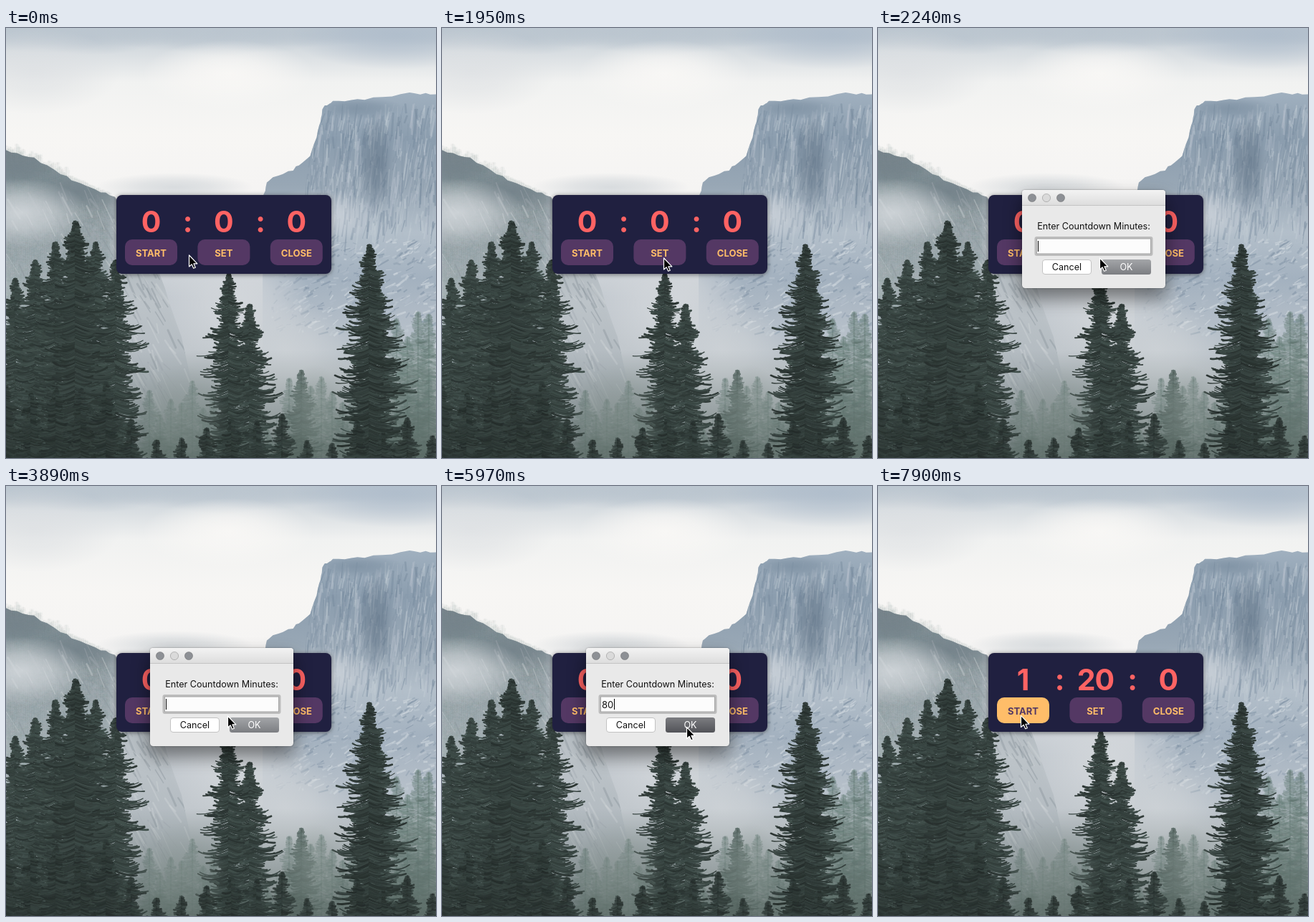
An HTML page with a canvas that plays this animation: 600x600 px, repeating every 8000 ms.

```html
<!DOCTYPE html>
<html lang="en">
<head>
<meta charset="utf-8">
<title>Countdown timer</title>
<style>
  html, body { margin: 0; width: 100%; height: 100%; overflow: hidden; background: #c5cbd0; }
  canvas, svg { position: absolute; left: 0; top: 0; width: 600px; height: 600px; }
  text { font-family: Inter, sans-serif; text-anchor: middle; }
  .digit { font-size: 41px; font-weight: 700; letter-spacing: -1px; fill: #ff6363; }
  .btn rect { fill: #543864; }
  .btn text { font-size: 13px; font-weight: 700; fill: #ffbd69; }
  .btn.hover rect { fill: #ffbd69; }
  .btn.hover text { fill: #543864; }
  .ui { font-size: 12.6px; fill: #111; }
  #panel { filter: drop-shadow(0 1px 3px rgba(0, 0, 0, .5)); }
  #window { filter: drop-shadow(0 13px 13px rgba(0, 0, 0, .38)) drop-shadow(0 0 1px rgba(0, 0, 0, .4)); }
</style>
</head>
<body>
<canvas id="scene" width="600" height="600"></canvas>
<svg viewBox="0 0 600 600">
  <defs>
    <linearGradient id="bar" x2="0" y2="1"><stop stop-color="#f3f3f3"/><stop offset="1" stop-color="#dcdcdc"/></linearGradient>
    <linearGradient id="ok" x2="0" y2="1"><stop stop-color="#a3a5a8"/><stop offset="1" stop-color="#7c7e82"/></linearGradient>
    <linearGradient id="okDown" x2="0" y2="1"><stop stop-color="#7c7d81"/><stop offset="1" stop-color="#525358"/></linearGradient>
  </defs>
  <rect id="panel" x="154" y="233" width="300" height="110" rx="8" fill="#202040"/>
  <g id="face"></g>
  <g id="dialog">
    <rect id="window" x="201" y="226" width="200" height="137" rx="4.5" fill="#e9e9e9"/>
    <path d="M201 248V230Q201 226 205 226H397Q401 226 401 230V248Z" fill="url(#bar)"/>
    <path d="M201 247.5H401" stroke="#c4c4c4"/>
    <g id="dots"></g>
    <text class="ui" x="301" y="281">Enter Countdown Minutes:</text>
    <rect x="218.5" y="291" width="165" height="27" rx="3" fill="#bdbdbd"/>
    <rect x="221.5" y="294" width="159" height="21" fill="#fcfcfc" stroke="#a5a5a5"/>
    <text class="ui" id="entry" x="223" y="309.5" style="text-anchor:start;font-size:13px"></text>
    <rect id="caret" y="297" width="1" height="15"/>
    <rect x="229.5" y="323.5" width="68" height="20" rx="3.5" fill="#fff" stroke="#c2c2c2"/>
    <text class="ui" x="263.5" y="338">Cancel</text>
    <rect id="okBtn" x="312" y="323" width="69" height="21" rx="3.5"/>
    <text class="ui" x="346.5" y="338" style="fill:#fff">OK</text>
  </g>
  <path id="cursor" d="M0 0V16L3.7 12.8L6.2 18.3L8.8 17.2L6.4 11.8H11.4Z" stroke="#fff" stroke-width="1.2" stroke-linejoin="round"/>
</svg>
<script>
const $ = id => document.getElementById(id);

// ---- Backdrop: misty valley ----
const ctx = $('scene').getContext('2d');
let seed = 11;
const rnd = () => {
  seed = (seed + 0x6D2B79F5) | 0;
  let n = Math.imul(seed ^ (seed >>> 15), 1 | seed);
  n = (n + Math.imul(n ^ (n >>> 7), 61 | n)) ^ n;
  return ((n ^ (n >>> 14)) >>> 0) / 4294967296;
};
const between = (a, b) => a + (b - a) * rnd();

function ramp(y0, y1, ...colors) {
  const g = ctx.createLinearGradient(0, y0, 0, y1);
  colors.forEach((c, i) => g.addColorStop(i / (colors.length - 1), c));
  return g;
}
function wash(y, fill) {
  ctx.fillStyle = fill;
  ctx.fillRect(0, y, 600, 600 - y);
}
function soft(x, y, rx, ry, color, alpha) {
  const g = ctx.createRadialGradient(0, 0, 0, 0, 0, 1);
  g.addColorStop(0, color);
  g.addColorStop(.45, color + 'b0');
  g.addColorStop(1, color + '00');
  ctx.save();
  ctx.globalAlpha = alpha;
  ctx.translate(x, y);
  ctx.scale(rx, ry);
  ctx.fillStyle = g;
  ctx.fillRect(-1, -1, 2, 2);
  ctx.restore();
}
// Rock face with a jagged skyline, falling to the bottom of the stage
function rock(skyline, fill) {
  const p = skyline.split(' ').map(s => s.split(',').map(Number));
  const path = new Path2D(`M${p[0][0]} 600`);
  p.forEach(([x, y], i) => {
    const [nx, ny] = p[i + 1] || [x, y];
    for (let k = 0; k < 1; k += .2)
      path.lineTo(x + (nx - x) * k + between(-1, 1), y + (ny - y) * k + between(-1.5, 1.5));
  });
  path.lineTo(p.at(-1)[0], 600);
  ctx.fillStyle = fill;
  ctx.fill(path);
  return path;
}
function streaks(count, x0, y0, x1, y1, dx, dy, colors) {
  ctx.globalAlpha = .4;
  for (let i = 0; i < count; i++) {
    const x = between(x0, x1), y = between(y0, y1), k = between(.2, 1);
    ctx.strokeStyle = colors[i % colors.length];
    ctx.lineWidth = between(.6, 3);
    ctx.beginPath();
    ctx.moveTo(x, y);
    ctx.lineTo(x + dx * k + between(-4, 4), y + dy * k + between(-4, 4));
    ctx.stroke();
  }
  ctx.globalAlpha = 1;
}
// Conifer: ragged boughs, widening downwards to the full half-width
function tree(x, top, width, tone = 24, alpha = 1) {
  ctx.globalAlpha = alpha;
  ctx.lineCap = 'round';
  for (const side of [-1, 1]) {
    const phase = rnd() * 6;
    for (let y = 0; top + y < 605; y += 1.1) {
      const tier = .72 + .28 * Math.sin(y * .21 + phase + Math.sin(y * .06));
      const r = 2 + width * Math.min(1, (y / width / 2.7) ** .8) * tier * between(.3, 1.1);
      ctx.strokeStyle = `hsl(165 10% ${tone + between(-5, 5)}%)`;
      ctx.lineWidth = between(1, 3);
      ctx.beginPath();
      ctx.moveTo(x, top + y - r * .1);
      ctx.quadraticCurveTo(x + side * r * .6, top + y + r * .2, x + side * r, top + y + between(-.1, .2) * r);
      ctx.stroke();
    }
  }
  ctx.globalAlpha = 1;
}

function paintScene() {
  const blues = ['#71849a', '#c3ccd5', '#8596a7', '#b3bfca'];
  const greys = ['#87929a', '#d0d4d7', '#a0a9b0'];

  wash(0, ramp(0, 600, '#c3ccd4', '#f1f2f1', '#f7f6f4', '#f5f4f3', '#d8dce0', '#c5cbd1', '#c2c8cd', '#a4adb1', '#78868a'));
  for (let x = 0; x <= 600; x += 60)
    soft(x, between(0, 14), 95, between(14, 36), '#b9c4ce', .7);
  soft(545, 10, 150, 48, '#aebccb', .8);
  soft(40, 60, 120, 60, '#dcdfe2', .7);
  soft(310, 65, 120, 48, '#f8f7f5', 1);
  soft(235, 222, 110, 20, '#d5d9dc', .9);

  ctx.save();
  ctx.clip(rock('358,236 366,212 400,198 424,180 438,135 443,110 456,102 500,100 563,90 600,93',
    ramp(90, 480, '#a0b0bf', '#8b9dae', '#98a7b5', '#b3bfca', '#a3b1bf', '#b4bec8', '#c3c9ce')));
  streaks(600, 420, 105, 600, 280, -5, 42, blues);
  soft(516, 190, 26, 75, '#5f7285', .6);
  soft(490, 112, 65, 16, '#7d90a2', .8);
  streaks(500, 370, 295, 600, 430, 12, -6, ['#e3e8ec', ...blues]);
  ctx.restore();

  const slope = rock('0,170 40,182 84,208 118,224 152,236 205,320 245,430 285,600',
    ramp(165, 600, '#7c8991', '#a9b2b8', '#bcc3c8', '#b0b8be', '#a0a9af'));
  for (let x = 0; x < 145; x += 3)
    tree(x, 170 + x * .43 - between(0, x < 85 ? 14 : 3), 5, 46, .03);
  ctx.save();
  ctx.clip(slope);
  soft(100, 228, 75, 30, '#74828a', .9);
  soft(15, 195, 60, 28, '#74828a', .8);
  streaks(420, 0, 210, 270, 560, 20, 36, greys);
  ctx.restore();

  soft(20, 258, 95, 48, '#d3d8dc', .9);
  soft(435, 262, 85, 38, '#d5dae0', .8);
  soft(325, 380, 100, 90, '#d3d7db', .9);
  soft(390, 450, 85, 75, '#cdd2d6', .9);

  // distant trees fade into the mist, nearer ones grow darker
  for (let x = 200; x < 600; x += 15)
    tree(x, x < 300 || x > 390 ? between(485, 540) : 560, 18, 46, .3);
  for (let x = 545; x < 605; x += 15)
    tree(x, between(395, 435), 26, 45, .35);
  tree(412, 478, 27, 36, .7);
  wash(450, ramp(450, 600, '#6f7c7a00', '#56645fc0'));

  for (let x = 13; x < 160; x += 28)
    tree(x, 274 + Math.abs(x - 97) * .9, 42);
  tree(97, 270, 58, 22);
  tree(340, 386, 44);
  tree(311, 343, 42, 23);
  tree(516, 350, 52, 26);
  tree(507, 303, 48, 21);

  soft(245, 540, 65, 70, '#87938f', .4);
  soft(430, 530, 45, 60, '#8b9793', .4);
  for (let x = 0; x <= 600; x += 35)
    tree(x, between(530, 580) - (x < 150 ? 40 : 0), 38, 20, .75);
}

// ---- Timer panel ----
const BTN_W = 73, PITCH = 101.4;
const labels = ['START', 'SET', 'CLOSE'];
$('face').innerHTML = labels.map((label, i) => {
  const x = 166 + PITCH * i, mid = x + BTN_W / 2;
  const colon = i < 2 ? `<text class="digit" x="${mid + PITCH / 2}" y="284.5">:</text>` : '';
  return `<text class="digit" id="num${i}" x="${mid - .5}" y="284.5">0</text>${colon}
    <g id="btn${i}"><rect x="${x}" y="295" width="${BTN_W}" height="36" rx="10"/><text x="${mid}" y="318.5">${label}</text></g>`;
}).join('');
$('dots').innerHTML = [215, 235, 255].map(x =>
  `<circle cx="${x}" cy="237" r="5.6" stroke="#0003" fill="${x === 235 ? '#dadada' : '#8d9095'}"/>`).join('');

// ---- Timeline ----
const LOOP = 8000, TICK = 149.2;
const CLICK_SET = 1950, OPEN = 2090, KEYS = [4340, 4640], PRESS = 5970, SHUT = 6120;
const BLINK = 900;
const legs = [
  { from: 0, to: 900, x: 387, y: 319 },
  { from: 1050, to: 1940, x: 309.5, y: 321 },
  { from: 5000, to: 5670, x: 341.5, y: 336.5 },
  { from: 7020, to: 7890, x: 197.5, y: 319.5, dip: 16 }
];
const ease = p => p < .5 ? 4 * p ** 3 : 1 - 4 * (1 - p) ** 3;

// The pointer is sampled once per tick, so it moves in hard steps
function pointer(t) {
  const now = Math.floor(t / TICK + .03) * TICK;
  let x = 255.5, y = 317;
  for (const leg of legs) {
    const p = ease(Math.min(1, Math.max(0, (now - leg.from) / (leg.to - leg.from))));
    x += (leg.x - x) * p;
    y += (leg.y - y) * p + (leg.dip || 0) * Math.sin(Math.PI * p);
  }
  return [x, y];
}

function draw(t) {
  const [x, y] = pointer(t);
  const done = t >= SHUT;
  const live = t < CLICK_SET || done;
  const typed = KEYS.filter(k => k <= t);
  const blink = (t - (typed.at(-1) || OPEN)) % BLINK;

  $('cursor').setAttribute('transform', `translate(${x} ${y})`);
  labels.forEach((_, i) => {
    const dx = x - 166 - PITCH * i;
    $('btn' + i).setAttribute('class', live && dx >= 0 && dx < BTN_W && y < 331 ? 'btn hover' : 'btn');
  });
  $('num0').textContent = done ? 1 : 0;
  $('num1').textContent = done ? 20 : 0;

  $('dialog').style.display = t >= OPEN && !done ? '' : 'none';
  $('entry').textContent = '80'.slice(0, typed.length);
  $('caret').setAttribute('x', 223 + 8.5 * typed.length);
  $('caret').style.opacity = blink < BLINK / 2 ? 1 : 0;
  $('okBtn').setAttribute('fill', t >= PRESS ? 'url(#okDown)' : 'url(#ok)');
}

paintScene();
const start = performance.now();
function tick() {
  draw((performance.now() - start) % LOOP);
  requestAnimationFrame(tick);
}
tick();
</script>
</body>
</html>
```
